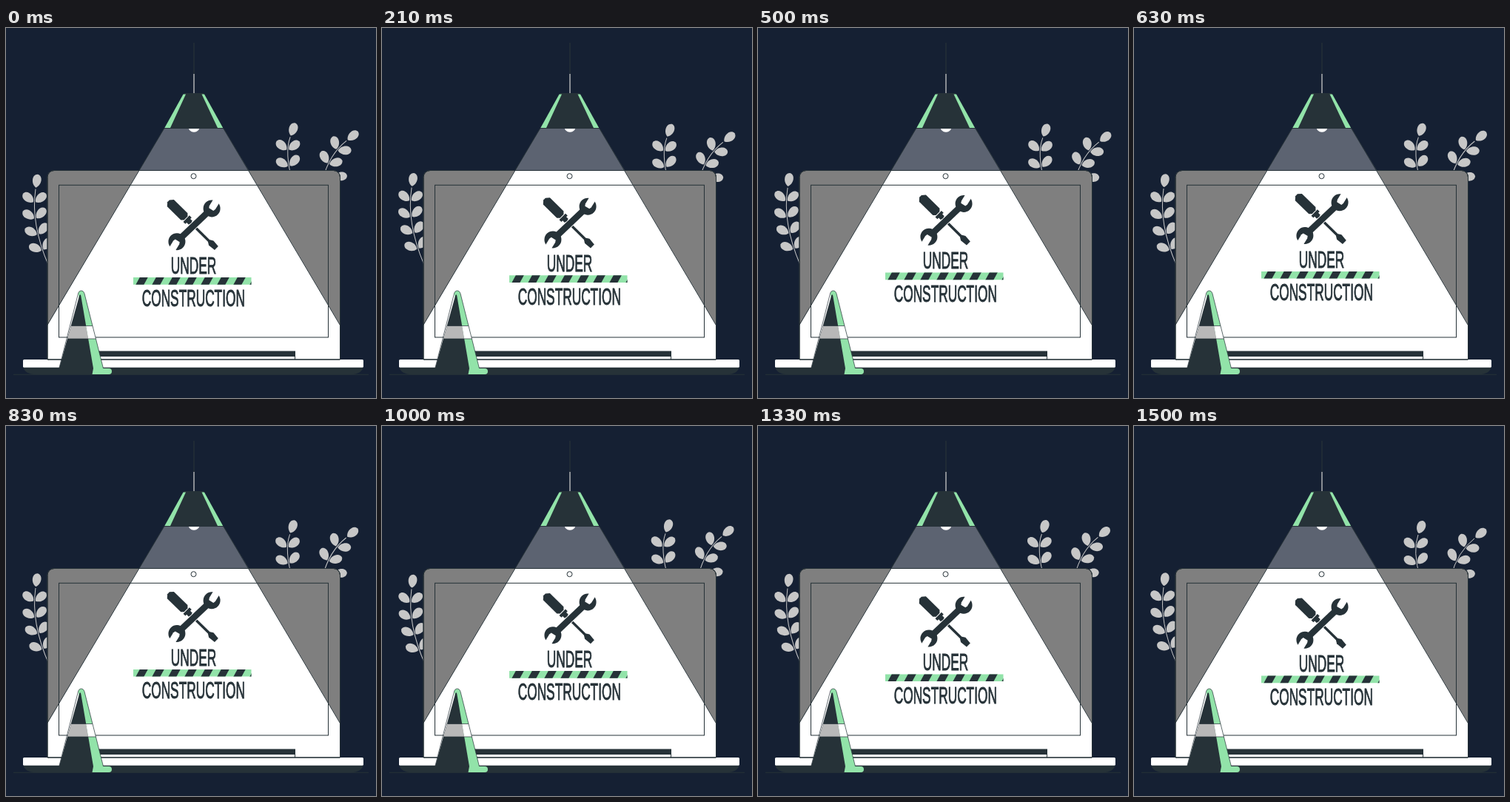
An HTML page for the animation above (1.54 s loop, 500 by 500 pixels).

```html
<!DOCTYPE html>
<html lang="en">
<head>
<meta charset="utf-8">
<title>Under construction</title>
<style>
  html, body { margin: 0; width: 100%; height: 100%; overflow: hidden; background: #152033; }
  svg { display: block; width: 100%; height: 100%; }
  .dark { fill: #263238; }
  .green { fill: #92e3a9; }
  .line { fill: none; stroke: #263238; }
  .white { fill: #fff; stroke: #263238; }
  .sign { font: 32px "Liberation Sans", Arial, sans-serif; text-anchor: middle; fill: #263238; stroke: #263238; stroke-width: .8; }
  .sign text { vector-effect: non-scaling-stroke; }
  .stem { fill: none; stroke: #c7c7c7; }
</style>
</head>
<body>
<svg viewBox="0 0 500 500">
  <defs>
    <path id="leaf" d="M0-2C-7.500-6-8-19 0-20C8-19 7.500-6 0-2Z"/>
    <path id="lid" d="M56 448V201.500a9 9 0 0 1 9-9H442.500a9 9 0 0 1 9 9V448Z"/>
    <clipPath id="screen"><use href="#lid"/></clipPath>
    <clipPath id="tape"><rect x="172" y="337.600" width="159.500" height="9.600"/></clipPath>
  </defs>

  <path class="line" d="M10 468.300H490"/>

  <g id="plants" fill="#c7c7c7">
    <path class="stem" d="M40 218Q33 265 58 322"/>
    <path class="stem" d="M384 147Q376 168 387 207"/>
    <path class="stem" d="M460 152Q437 170 428 204"/>
    <use href="#leaf" transform="translate(441 201) rotate(85)"/>
  </g>

  <!-- light beam, lamp -->
  <path d="M213.500 136H294L328 192.500H180Z" fill="#fff" fill-opacity=".3"/>
  <path class="line" d="M254 20V62" stroke-width="1.300"/>
  <path d="M254 62V88" stroke="#c7c7c7" stroke-width="1.300"/>
  <circle cx="254" cy="133" r="7.800" fill="#fff"/>
  <path class="dark" d="M241 88H266.500L294 136H213.500Z"/>
  <path class="green" d="M239.500 89.500H243L222 135H214.300Z"/>
  <path class="green" d="M264.500 89.500H268L293.200 135H286Z"/>

  <!-- laptop -->
  <use href="#lid" class="white"/>
  <g clip-path="url(#screen)" opacity=".5">
    <path d="M55.500 192H180L55.500 402ZM452 192H327.500L452 402Z"/>
  </g>
  <use href="#lid" class="line"/>
  <rect class="line" x="71.500" y="212.300" width="364" height="205.700"/>
  <path class="line" d="M213.500 136L55.500 402M294 136L451.700 402"/>
  <circle class="white" cx="253.500" cy="200.200" r="3.500"/>
  <rect class="dark" x="117" y="436.500" width="274" height="7.500"/>
  <path class="line" d="M390.500 437V448"/>
  <path class="dark" d="M23.500 458H482.500C482 464 475 468.300 466 468.300H40C31 468.300 24 464 23.500 458Z"/>
  <rect x="23" y="448" width="460" height="10.800" rx="1.500" fill="#fff"/>
  <path class="line" d="M56 448.300H451.500"/>

  <!-- traffic cone -->
  <path class="green" d="M97.500 359C98.500 354 104.500 353.500 106 359L131.500 460H139a4 4 0 0 1 0 8H116Z"/>
  <path class="dark" d="M99.500 360.500H101L118 460L116.500 468H72V459Z"/>
  <path d="M88 402.500H108.200L111.200 420H83Z" fill="#b8b8b8"/>
  <path d="M108.200 402.500H117L121.500 420H111.200Z" fill="#fff"/>
  <path class="line" d="M72 459L97.500 359C98.500 354 104.500 353.500 106 359L131.500 460M88 402.500H117M83 420H121.500" stroke-width=".7"/>

  <g id="sign">
    <g class="dark" transform="translate(253 267.300) rotate(44.500)">
      <path d="M-47-2L-43-6.500H-17L-14-3.500V3.500L-17 6.500H-43L-47 2Z"/>
      <path d="M-13-6H-9V-3.500H-5V3.500H-9V6H-13Z"/>
      <rect x="-6" y="-1.700" width="38" height="3.400"/>
      <path d="M30-2L34-4.500L44-3.500V3.500L34 4.500L30 2Z"/>
    </g>
    <g transform="translate(254.500 266.800) rotate(-43.500)">
      <rect x="-25" y="-5.200" width="50" height="10.400" fill="#fff"/>
      <g class="dark">
        <rect x="-27" y="-4.300" width="54" height="8.600"/>
        <circle cx="32.500" r="11.500"/>
        <circle cx="-32.500" r="11.500"/>
      </g>
      <g fill="#fff">
        <path id="jaw" d="M31-3.500L34-4.700H48V4.700H34L31 3.500Z" transform="rotate(-15 32.500 0)"/>
        <use href="#jaw" transform="rotate(180)"/>
      </g>
    </g>
    <g class="sign">
      <text transform="translate(253.500 332.300) scale(.54 1)">UNDER</text>
      <text transform="translate(253.300 376.900) scale(.54 1)">CONSTRUCTION</text>
    </g>
    <g id="stripes" clip-path="url(#tape)">
      <rect class="green" x="172" y="337" width="160" height="11"/>
    </g>
  </g>
</svg>
<script>
  const byId = id => document.getElementById(id);
  const add = (parent, tag, attrs) => {
    const el = document.createElementNS("http://www.w3.org/2000/svg", tag);
    for (const key in attrs) el.setAttribute(key, attrs[key]);
    parent.append(el);
  };
  const plants = byId("plants"), sign = byId("sign");

  // One leaf at the tip of the stem, then pairs at even steps down it.
  function grow(stem) {
    const leafAt = (d, turn) => {
      const a = stem.getPointAtLength(d), b = stem.getPointAtLength(d + 1);
      const up = Math.atan2(b.y - a.y, b.x - a.x) * 180 / Math.PI - 90;
      add(plants, "use", { href: "#leaf", transform: `translate(${a.x} ${a.y}) rotate(${up + turn})` });
    };
    leafAt(0, 0);
    for (let d = 19; d < stem.getTotalLength(); d += 22) {
      leafAt(d, -50);
      leafAt(d, 50);
    }
  }
  plants.querySelectorAll(".stem").forEach(grow);

  for (let x = 181; x < 340; x += 22)
    add(byId("stripes"), "path", { class: "dark", d: `M${x} 337h11l-6 11h-11z` });

  const LOOP = 1540, FRAMES = 37, STEP = 1000 / 24;

  function draw() {
    const t = performance.now() % LOOP;
    const p = (Math.floor((t + 5) / STEP) + 1) / FRAMES % 1;
    const wave = x => 1 - Math.abs(1 - 2 * (x % 1));   // linear 0 → 1 → 0
    const lift = 10 * wave(p);
    const sway = 2 * wave(p + .25) - 1;
    sign.setAttribute("transform", `translate(0 ${-lift})`);
    plants.setAttribute("transform", `rotate(${sway} 246 225)`);
    requestAnimationFrame(draw);
  }
  draw();
</script>
</body>
</html>
```
